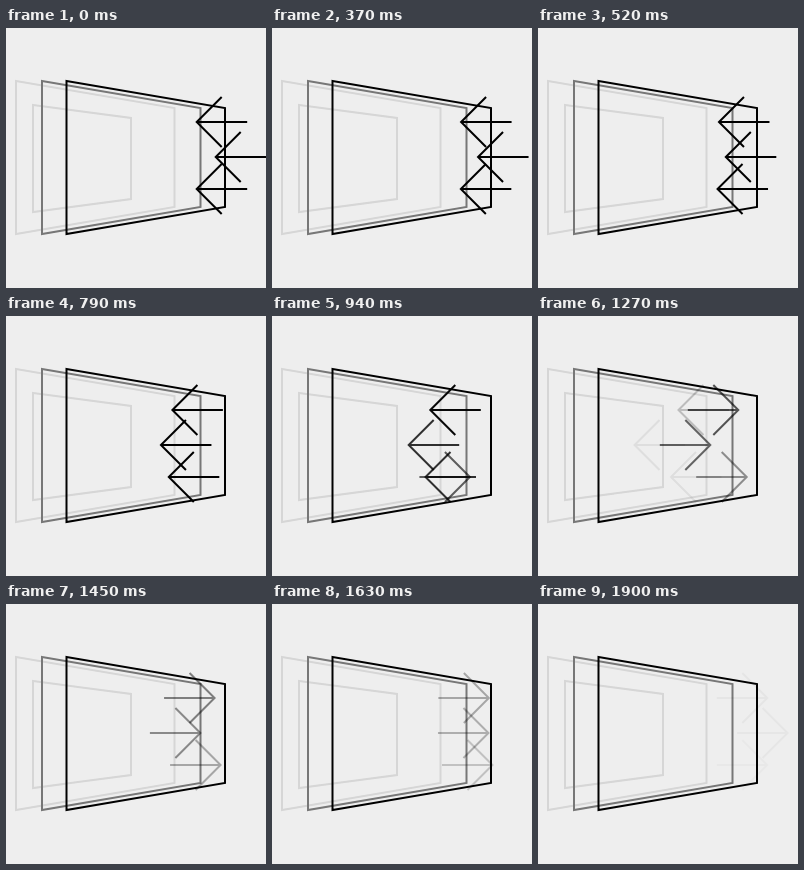
An HTML page that plays this animation: 260 by 260 pixels, repeating every 2790 ms.

```html
<!DOCTYPE html>
<html lang="en">
<head>
<meta charset="utf-8">
<title>Arrows and panels</title>
<style>
  html, body { margin: 0; width: 100%; height: 100%; overflow: hidden; background: #eee; }
  svg { display: block; width: 100vw; height: 100vh; }
  path { fill: none; stroke-width: 2; }
</style>
</head>
<body>
<svg viewBox="0 0 260 260">
  <g id="panels"></g>
  <g id="arrows" stroke="#000"></g>
</svg>
<script>
const LOOP = 2790, HOLD = 370, STEP = 30, LAST = 52;

// Tip position is x + v * (step - at); opacity falls linearly from `full` to `gone`.
const arrows = [
  { dir: -1, y: 94,  x: 190.7, v: -1.62, at: 0, from: 0, full: 19.5, gone: 34 },
  { dir: -1, y: 129, x: 209.7, v: -3.65, at: 0, from: 0, full: 17, gone: 32 },
  { dir: -1, y: 161, x: 190.7, v: -1.86, at: 0, from: 0, full: 17, gone: 32 },
  { dir: 1, y: 94,  x: 200.3, v: 1.38, at: 31, from: 27, full: 19, gone: 53.3 },
  { dir: 1, y: 129, x: 172.3, v: 3.68, at: 31, from: 27, full: 15, gone: 53.3 },
  { dir: 1, y: 161, x: 208.7, v: 0.98, at: 31, from: 19, full: -1, gone: 53.3 }
];

function addPath(parent, d, stroke) {
  const p = document.createElementNS("http://www.w3.org/2000/svg", "path");
  p.setAttribute("d", d);
  if (stroke) p.setAttribute("stroke", stroke);
  document.getElementById(parent).appendChild(p);
  return p;
}

const panel = (x, color) => addPath("panels", `M${x} 53l158.5 27v99l-158.5 27z`, color);

addPath("panels", "M27 77L125 90V171L27 184Z", "#d6d6d6");
panel(10, "#d6d6d6");
panel(36, "#777");
panel(60.5, "#000");

for (const a of arrows) {
  const back = -25 * a.dir;
  a.el = addPath("arrows", `M${back} -25L0 0L${back} 25M0 0H${-50.5 * a.dir}`);
}

function render(time) {
  const t = time % LOOP;
  const k = t < HOLD ? 0 : Math.min(LAST, Math.floor((t - HOLD) / STEP) + 1);
  for (const a of arrows) {
    const fade = (a.gone - k) / (a.gone - a.full);
    const alpha = k < a.from ? 0 : Math.max(0, Math.min(1, fade));
    a.el.setAttribute("transform", `translate(${a.x + a.v * (k - a.at)} ${a.y})`);
    a.el.setAttribute("opacity", alpha);
  }
}

const start = performance.now();
function tick() {
  render(performance.now() - start);
  requestAnimationFrame(tick);
}
tick();
</script>
</body>
</html>
```
